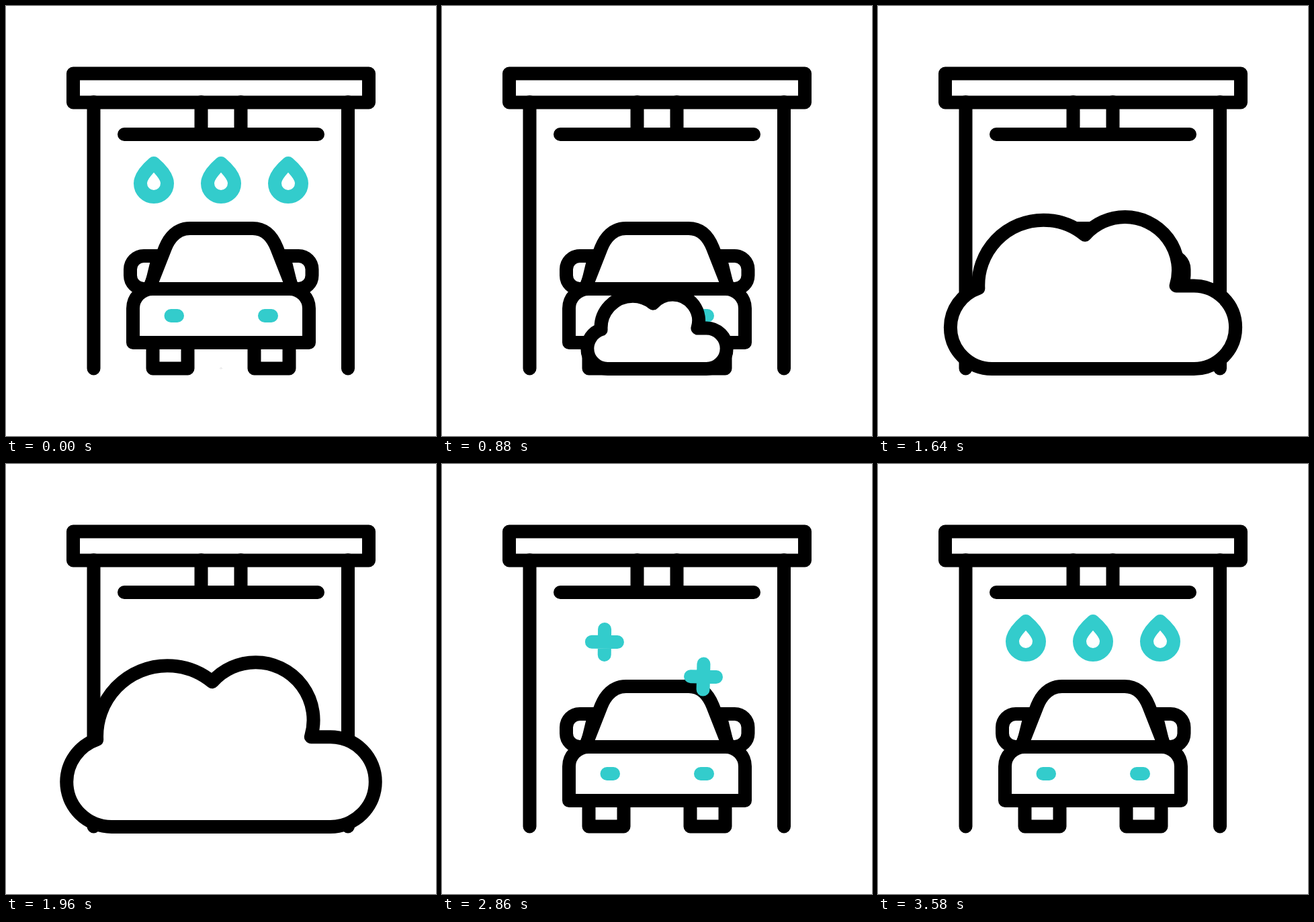
Recreate the animation shown at these times as an HTML page. Size 640 px wide and 640 px high, loop 3.6 s.

```html
<!DOCTYPE html>
<html lang="en">
<head>
<meta charset="utf-8">
<title>Car wash</title>
<style>
  html, body { margin: 0; height: 100%; overflow: hidden; background: #fff; }
  svg { display: block; width: 100vw; height: 100vh; }
</style>
</head>
<body>
<svg viewBox="0 0 640 640" fill="none" stroke="#000" stroke-width="20" stroke-linecap="round" stroke-linejoin="round">
  <defs>
    <clipPath id="belowPipe"><path d="M0 201H640V640H0z"/></clipPath>
    <path id="drop" d="M0 -26C-7 -20 -20 -7 -20 4A20 20 0 0 0 20 4C20 -7 7 -20 0 -26z"/>
    <path id="plus" d="M-19 0H19M0 -19V19"/>
    <path id="mirror" d="M227 372H205A20 20 0 0 0 185 392V401A20 20 0 0 0 205 421H215z"/>
    <path id="wheel" d="M218.500 501H270.500V539.500H218.500z"/>
  </defs>

  <g clip-path="url(#belowPipe)">
    <g id="drops" stroke="#3cc">
      <use href="#drop" x="220"/><use href="#drop" x="320"/><use href="#drop" x="420"/>
    </g>
  </g>

  <path d="M130.500 143V539.500M509 143V539.500M290.500 143V190M349.500 143V190M176 191H464"/>
  <path d="M100 100.500H540V143.500H100z"/>

  <g fill="#fff">
    <use href="#mirror"/>
    <use href="#mirror" transform="matrix(-1 0 0 1 640.500 0)"/>
    <use href="#wheel"/><use href="#wheel" x="151"/>
    <path d="M213 421L237 360C243 345 254 331 274 331H367C387 331 397 345 403 360L427 421z"/>
    <path d="M189 501V450A29 29 0 0 1 218 421H422A29 29 0 0 1 451 450V501z"/>
  </g>
  <path stroke="#3cc" d="M245.500 461H255M385 461H395"/>

  <path id="cloud" fill="#fff"/>

  <g stroke="#3cc">
    <use id="plusLeft" href="#plus"/>
    <use id="plusRight" href="#plus"/>
  </g>
</svg>
<script>
const LOOP = 3600;
const $ = id => document.getElementById(id);
const ramp = (t, from, to) => Math.min(1, Math.max(0, (t - from) / (to - from)));
const smooth = u => u * u * (3 - 2 * u);
const mix = (a, b, u) => a + (b - a) * u;

// Height of the drops; they vanish behind the car or the foam.
function dropY(t) {
  if (t < 540) return 260 + 165 * (t / 540) ** 2;
  if (t >= 3260) return 260 - 95 * (1 - ramp(t, 3260, 3600)) ** 3;
  if (t < 560 || t >= 2000) return 165;
  return mix(165, 425, ramp((t - 560) % 360, 0, 320));
}

// Foam outline, growing from the ground while its line keeps its weight.
function cloudPath(s) {
  const p = (x, y) => `${320 + x * s} ${540 + y * s}`;
  const arc = (r, x, y) => `A${r * s} ${r * s} 0 0 1 ${p(x, y)}`;
  return `M${p(-163, 0)}` + arc(67, -230, -67) + arc(67, -185, -130) +
    arc(105, -80, -240) + arc(105, -13, -216) + arc(86, 52, -245) + arc(86, 134, -134) +
    `L${p(163, -134)}` + arc(67, 230, -67) + arc(67, 163, 0) + 'z';
}

function drawCloud(t) {
  const cloud = $('cloud');
  cloud.setAttribute('d', cloudPath(smooth(ramp(t, -100, 2000))));
  cloud.setAttribute('stroke-width', 20 * ramp(t, 0, 200));
  cloud.setAttribute('opacity', t > 0 ? 1 - ramp(t, 2000, 2500) : 0);
}

function drawPlus(id, t, start, x0, x1, y0, y1) {
  const u = smooth(ramp(t, start, start + 900));
  const alpha = ramp(t, start + 15, start + 115) - ramp(t, start + 830, start + 930);
  $(id).setAttribute('transform',
    `translate(${mix(x0, x1, u)} ${mix(y0, y1, u)}) rotate(${3 * (1 - u)})`);
  $(id).setAttribute('opacity', alpha);
}

function draw() {
  const t = performance.now() % LOOP;
  $('drops').setAttribute('transform', `translate(0 ${dropY(t)})`);
  drawCloud(t);
  drawPlus('plusLeft', t, 2200, 251, 240, 383, 240);
  drawPlus('plusRight', t, 2380, 389, 389, 412, 239);
  requestAnimationFrame(draw);
}
draw();
</script>
</body>
</html>
```
